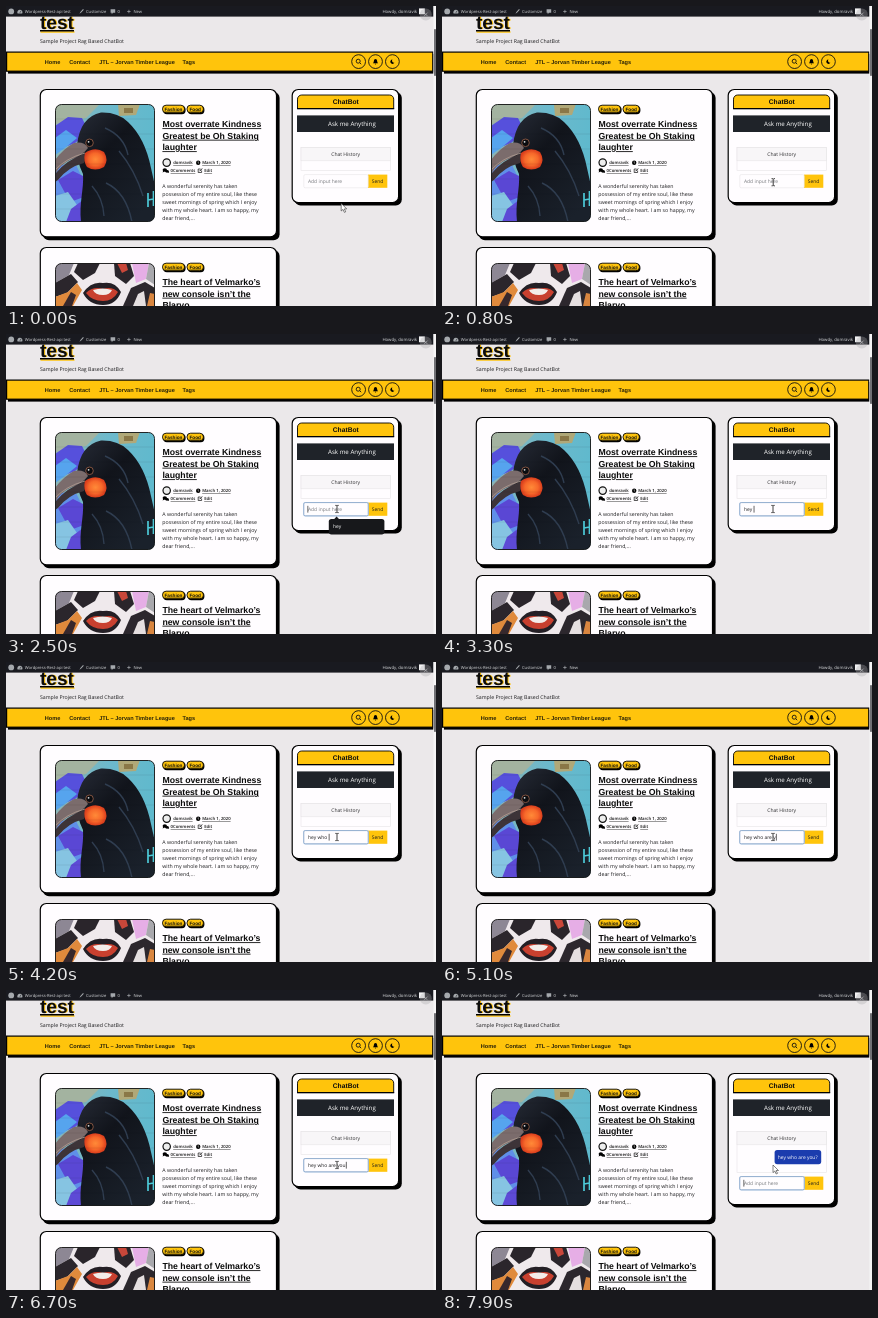
Write an HTML page that moves like this. It is 430x300 px and loops after 8000 ms.

```html
<!DOCTYPE html>
<html lang="en">
<head>
<meta charset="utf-8">
<title>ChatBot page</title>
<style>
  html, body { margin: 0; width: 100%; height: 100%; overflow: hidden; background: #ebe8ea; }
  svg { display: block; width: 430px; height: 300px; }
  text { font-family: "Open Sans", "Noto Sans", sans-serif; font-size: 5.22px; fill: #1c1c1e; text-rendering: geometricPrecision; white-space: pre; }
  .bold text, text.bold { font-family: "Liberation Sans", Arial, sans-serif; font-weight: 700; fill: #0c0c0c; }
  .nav text { font-size: 5.6px; fill: #2b2408; }
  .site { font-size: 19.1px; }
  .title text { font-size: 8.73px; text-decoration: underline; text-decoration-thickness: .8px; }
  .meta text { font-size: 4.25px; font-weight: 600; fill: #111; text-decoration: underline; text-decoration-thickness: .4px; }
  .tag text { font-size: 4.7px; text-decoration: underline; text-decoration-thickness: .4px; }
  .admin text { font-size: 4.15px; fill: #d8dadc; }
  .admin .right { font-size: 4.3px; text-anchor: end; }
  .field text { font-size: 4.92px; }
  .mid { text-anchor: middle; }
  .card { fill: #fffdff; stroke: #000; stroke-width: 1.2; }
  .pill { fill: #ffc40c; stroke: #000; stroke-width: .9; }
  .line { fill: none; stroke: #111; stroke-width: .9; }
</style>
</head>
<body>
<svg viewBox="0 0 430 300">
  <defs>
    <clipPath id="pic1"><rect x="49.5" y="98.5" width="99" height="117" rx="6"/></clipPath>
    <clipPath id="pic2"><rect x="49.5" y="257.5" width="99" height="117" rx="6"/></clipPath>
    <linearGradient id="wall" x2="1" y2=".3">
      <stop stop-color="#93b3ae"/><stop offset=".5" stop-color="#6db9cc"/><stop offset="1" stop-color="#5fb9cd"/>
    </linearGradient>
    <linearGradient id="plume" x2=".7" y2="1">
      <stop stop-color="#262b36"/><stop offset=".4" stop-color="#11141b"/><stop offset="1" stop-color="#1a212b"/>
    </linearGradient>
    <radialGradient id="cheek">
      <stop stop-color="#ff8a38"/><stop offset=".6" stop-color="#f7682a"/><stop offset="1" stop-color="#d93d1c"/>
    </radialGradient>
    <g id="tags" class="tag bold">
      <rect x="157.2" y="100" width="22.4" height="8.2" rx="3.6"/>
      <rect x="181.8" y="100" width="16.6" height="8.2" rx="3.6"/>
      <rect class="pill" x="156.5" y="99.2" width="22" height="7.6" rx="3.6"/>
      <rect class="pill" x="181" y="99.2" width="16.4" height="7.6" rx="3.6"/>
      <text class="mid" x="167.5" y="104.7">Fashion</text>
      <text class="mid" x="189.2" y="104.7">Food</text>
    </g>
  </defs>

  <rect width="430" height="300" fill="#ebe8ea"/>

  <!-- header -->
  <text class="bold site" x="35" y="23.4" style="fill:#ffc40c">test</text>
  <text class="bold site" x="34" y="22.6">test</text>
  <path d="M34.5 26h34" stroke="#ffc40c" stroke-width="1.4"/>
  <path d="M34 24.8h34" stroke="#000" stroke-width="1.5"/>
  <text x="34" y="37.4">Sample Project Rag Based ChatBot</text>

  <rect x="2" y="48" width="425.5" height="19.6"/>
  <rect class="pill" x=".6" y="46.1" width="426.2" height="19.1" style="stroke-width:1.2"/>
  <g class="bold nav">
    <text x="38.8" y="57.6">Home</text>
    <text x="63.2" y="57.6">Contact</text>
    <text x="93.2" y="57.6">JTL – Jorvan Timber League</text>
    <text x="176.4" y="57.6">Tags</text>
  </g>
  <g class="line">
    <circle cx="352.6" cy="55.6" r="6.9"/><circle cx="369.5" cy="55.6" r="6.9"/><circle cx="386.4" cy="55.6" r="6.9"/>
    <circle cx="352.2" cy="55.2" r="2"/><path d="M353.7 56.7l1.5 1.5"/>
  </g>
  <path d="M366.9 57.3q1-1 1-2.6a1.6 1.6 0 0 1 3.2 0q0 1.6 1 2.6zM368.8 57.8h1.4a.7.7 0 0 1-1.4 0z"/>
  <path d="M386.4 53.5a2.2 2.2 0 1 0 2 3.3a2.1 2.1 0 0 1-2-3.3z"/>

  <!-- first post -->
  <rect x="37" y="86" width="236.6" height="148.2" rx="6"/>
  <rect class="card" x="34.3" y="83.5" width="236.2" height="147.3" rx="6"/>
  <g clip-path="url(#pic1)">
    <rect x="49" y="98" width="100" height="118" fill="url(#wall)"/>
    <path d="M49 98h45l-14 14-31 6z" fill="#a3b3a0"/>
    <path d="M112 98h22l-4 11-17 1z" fill="#b0a878"/>
    <path d="M118 102h9v5h-9z" fill="#8a7747"/>
    <path d="M49 120l13-9 14 1 7 14-14 11-20 8z" fill="#5650dc"/>
    <path d="M49 132l11-8 11 8-12 10-10 7z" fill="#56a4ee"/>
    <path d="M49 160l20-3 11 22-4 37H49z" fill="#5f8fe8"/>
    <path d="M52 174l15-9 12 6-1 20-14 5z" fill="#5a47d4"/>
    <path d="M49 190l13-4 9 13-9 17H49z" fill="#86c4e2"/>
    <path d="M60 216l5-13 12-9 3 22z" fill="#5d4ad6"/>
    <path d="M75 216C73 196 78 184 77 168Q70 154 71 139Q74 111 95 106.5Q112 106 122 116Q139 132 145 162L149 180V216z" fill="url(#plume)"/>
    <path d="M49 154Q57 143 68 137Q78 135 82 142Q76 150 64 154Q55 158 49 168z" fill="#7b6c6c"/>
    <path d="M49 168Q60 154 80 147L78 157Q62 161 52 174L49 176z" fill="#3d3438"/>
    <path d="M49 164Q60 152 79 147" fill="none" stroke="#b29d92" stroke-width=".8"/>
    <circle cx="83.5" cy="136.8" r="3.8" fill="#0a0c10" stroke="#8d5a44" stroke-width=".9"/>
    <circle cx="82.6" cy="135.8" r=".9" fill="#dce1e4"/>
    <path d="M79 147q10-7 19-1 5 8 0 15-9 5-17 0-4-6-2-14z" fill="url(#cheek)"/>
    <path d="M100 177Q120 186 126 216M113 145Q129 164 137 190M99 122Q118 130 122 149M86 180Q97 192 98 210" fill="none" stroke="#2f3d50" stroke-width="1.4"/>
    <path d="M49 113h100M49 128h100M49 143h100M49 158h100M49 173h100M49 188h100M49 203h100" stroke="#000" stroke-opacity=".13" stroke-width=".6"/>
    <path d="M142 187v14M147.5 185v15M142 194l5.5-1" fill="none" stroke="#4cc9d7" stroke-width="1.7"/>
  </g>
  <rect class="line" x="49.5" y="98.5" width="99" height="117" rx="6"/>
  <use href="#tags"/>
  <g class="bold title">
    <text x="156.4" y="121.2">Most overrate Kindness</text>
    <text x="156.4" y="132.7">Greatest be Oh Staking</text>
    <text x="156.4" y="144.2">laughter</text>
  </g>
  <g class="meta">
    <circle cx="160.7" cy="156.6" r="3.7" fill="#eee" stroke="#111" stroke-width="1.2"/>
    <text x="167.2" y="158.3">domravik</text>
    <circle cx="192.2" cy="156.8" r="2.2"/>
    <path d="M192.2 155.3v1.6l1 .8" fill="none" stroke="#fff" stroke-width=".5"/>
    <text x="196.2" y="158.3">March 1, 2020</text>
    <ellipse cx="158.8" cy="164" rx="2.2" ry="1.7"/><ellipse cx="161" cy="165.3" rx="1.8" ry="1.4"/>
    <path d="M157.2 164.8l-.6 1.6 2-.8zM161.5 166.2l1.6.8-.4-1.6z"/>
    <text x="164.6" y="166.3">0Comments</text>
    <path d="M194.5 163h-2.3v3.5h3.4v-2" fill="none" stroke="#111" stroke-width=".7"/>
    <path d="M193.6 165.2l2.5-2.7" stroke="#111" stroke-width="1"/>
    <text x="198.2" y="166.3">Edit</text>
  </g>
  <g id="excerpt"></g>

  <!-- second post -->
  <rect x="37" y="244" width="236.6" height="100" rx="6"/>
  <rect class="card" x="34.3" y="241.5" width="236.2" height="100" rx="6"/>
  <g clip-path="url(#pic2)">
    <rect x="49" y="257" width="100" height="60" fill="#efe9ec"/>
    <path d="M49 257h19l-5 12-14 8z" fill="#8d8794"/>
    <path d="M49 277l16-9 7 8-11 11-12 4z" fill="#2b262c"/>
    <path d="M49 291l13-5 9-9 5 7-9 16H49z" fill="#e08a3c"/>
    <path d="M57 300l8-14 5 3-4 11z" fill="#37282c"/>
    <path d="M72 257h22l-5 10-12 7-9-8z" fill="#2a252b"/>
    <path d="M108 257h16l4 13-8 8-11-8z" fill="#2a252b"/>
    <path d="M111 257h9l2 7-6 3z" fill="#c9473a"/>
    <path d="M126 257h17l-3 16-10 4z" fill="#e6aee6"/>
    <path d="M143 257h6v22l-9-6z" fill="#a9a8ad"/>
    <path d="M77 287q8-12 20-10 12-2 18 9-5 13-18 13-14 0-20-12z" fill="#241f25"/>
    <path d="M80 287q7-7 17-4 9-3 15 3-5 9-15 9-11 0-17-8z" fill="#c8402f"/>
    <path d="M87 284q10-3 19 0-2 5-9 5-8 0-10-5z" fill="#f3ece9"/>
    <path d="M117 300l8-18 14-6 10 6v18z" fill="#2c272d"/>
    <path d="M127 300l5-12 6-3 2 15z" fill="#e5dfe0"/>
    <path d="M141 300l3-13 5 1v12z" fill="#d98640"/>
  </g>
  <rect class="line" x="49.5" y="257.5" width="99" height="117" rx="6"/>
  <use href="#tags" y="158"/>
  <g class="bold title">
    <text x="156.4" y="279.2">The heart of Velmarko’s</text>
    <text x="156.4" y="290.7">new console isn’t the</text>
    <text x="156.4" y="302.2">Blarvo</text>
  </g>

  <!-- chat widget -->
  <rect id="shadow" x="288.6" y="86" width="107.2" rx="6"/>
  <rect id="box" class="card" x="286.2" y="83.5" width="106.4" rx="6"/>
  <path class="pill" d="M291.5 102.6v-9.4a4.2 4.2 0 0 1 4.2-4.2h87.8a4.2 4.2 0 0 1 4.2 4.2v9.4z"/>
  <path d="M291 102.6h97.2" stroke="#000" stroke-width="1.2"/>
  <text class="bold mid" x="339.8" y="98.4" style="font-size:6.7px">ChatBot</text>
  <rect x="291" y="109.4" width="97" height="16.6" fill="#1f2329"/>
  <text x="322" y="120.2" style="font-size:6.15px;fill:#fff">Ask me Anything</text>
  <rect id="log" x="295" y="141.5" width="89.4" fill="#fffdff" stroke="#e6e4e6" stroke-width=".6"/>
  <rect x="295" y="141.5" width="89.4" height="13.3" fill="#f8f6f8" stroke="#e6e4e6" stroke-width=".6"/>
  <text class="mid" x="339.7" y="150.2" style="font-size:5.04px;fill:#2c2c2e">Chat History</text>
  <g id="bubble" class="field">
    <rect x="332.6" y="160" width="46.6" height="14.2" rx="2.6" fill="#1b3cae"/>
    <text x="335.8" y="169" style="fill:#fff">hey who are you?</text>
  </g>
  <g id="form" class="field">
    <rect x="362" y="168.6" width="19.3" height="13.2" fill="#ffc40c"/>
    <text class="mid" x="371.6" y="177">Send</text>
    <rect id="glow" x="297.2" y="168" width="65.6" height="14.4" rx="2" fill="#bcd3ee"/>
    <rect id="input" x="297.8" y="168.6" width="64.4" height="13.2" rx="1.4" fill="#fffdff"/>
    <text id="hint" x="302" y="177" style="fill:#77797d">Add input here</text>
    <text id="typed" x="302" y="177"></text>
    <rect id="caret" y="171.8" width=".6" height="6.8"/>
  </g>
  <g id="suggest" class="field">
    <rect x="322.8" y="185" width="55.6" height="15.4" rx="2.6" fill="#17181b"/>
    <path d="M328 185.2l2.6-2.8 2.6 2.8z" fill="#17181b"/>
    <text x="327" y="194.4" style="fill:#fff">hey</text>
  </g>

  <!-- admin bar -->
  <g class="admin">
    <rect width="427.5" height="10.6" fill="#191a20"/>
    <circle cx="5.2" cy="5.4" r="2.9" fill="#a5a9ad"/>
    <path d="M11.6 7.6a2.6 2.6 0 1 1 4.6 0z" fill="#a5a9ad"/><path d="M13.9 6.8l1.1-2" stroke="#191a20" stroke-width=".6"/>
    <text x="18.8" y="7">Wordpress-Rest-api test</text>
    <path d="M73.4 7.8l1.2-2 2.4-2.8.8.7-2.6 2.8z" fill="#a5a9ad"/>
    <text x="80" y="7">Customize</text>
    <path d="M104.6 3.2h4.6v3.6h-2.2l-1.3 1.4v-1.4h-1.1z" fill="#a5a9ad"/>
    <text x="111.4" y="7">0</text>
    <path d="M121.2 5.5h3.4M122.9 3.8v3.4" stroke="#a5a9ad" stroke-width=".7"/>
    <text x="127.4" y="7">New</text>
    <text class="right" x="411" y="7">Howdy, domravik</text>
    <rect x="413" y="2.4" width="5.8" height="5.8" fill="#f2f2f3"/>
    <circle cx="419.8" cy="8.4" r="6" fill="#a9a9ad" fill-opacity=".35"/>
    <path d="M418 6.6l3.6 3.6M421.6 6.6l-3.6 3.6" stroke="#e4e4e6" stroke-opacity=".7" stroke-width=".7"/>
  </g>
  <rect x="427.5" width="2.5" height="300" fill="#f6f5f6"/>
  <rect x="428" y="23" width="2" height="47" rx=".8" fill="#707074"/>

  <g id="pointer">
    <path id="arrow" d="M0 0v7.6l1.8-1.6 1.4 3 1.3-.6-1.4-2.9h2.4z" fill="#fff" stroke="#333" stroke-width=".6"/>
    <path id="beam" d="M-1.7-3.6h1.2l.5.5.5-.5h1.2M0-3.1v6.2M-1.7 3.6h1.2l.5-.5.5.5h1.2" fill="none" stroke="#111" stroke-width=".8"/>
  </g>
</svg>
<script>
  const LOOP = 8000, FOCUS = 1100, SUGGEST = 1300, TYPE = 2700, KEY = 200, ASK = 7000, SEND = 7300;
  const MESSAGE = "hey who are you?";
  const GROW = 18;
  const $ = id => document.getElementById(id);
  const set = (id, attrs) => { for (const k in attrs) $(id).setAttribute(k, attrs[k]); };
  const show = (id, on) => { $(id).style.display = on ? "" : "none"; };

  $("excerpt").innerHTML = [
    "A wonderful serenity has taken",
    "possession of my entire soul, like these",
    "sweet mornings of spring which I enjoy",
    "with my whole heart. I am so happy, my",
    "dear friend,…"
  ].map((s, i) => `<text x="156.3" y="${182 + i * 8}">${s}</text>`).join("");

  function typedAt(t) {
    if (t < TYPE || t >= SEND) return "";
    if (t >= ASK) return MESSAGE;
    return MESSAGE.slice(0, Math.min(MESSAGE.length - 1, 1 + Math.floor((t - TYPE) / KEY)));
  }

  function render(t) {
    const sent = t >= SEND, focused = t >= FOCUS;
    const typing = t >= TYPE && t < TYPE + KEY * MESSAGE.length;
    const text = typedAt(t), grow = sent ? GROW : 0;

    set("shadow", { height: 113.6 + grow });
    set("box", { height: 113 + grow });
    set("log", { height: 23 + grow });
    set("form", { transform: `translate(0 ${grow})` });
    set("input", { stroke: focused ? "#7f9fc4" : "#e6e4e6", "stroke-width": focused ? .8 : .6 });
    show("glow", focused);
    show("bubble", sent);
    show("suggest", t >= SUGGEST && t < TYPE);

    $("typed").textContent = text;
    show("hint", !text);
    const width = text ? $("typed").getComputedTextLength() + .3 : -.4;
    set("caret", { x: 302 + width });
    show("caret", focused && (typing || t % 1060 < 530));

    // pointer glides into the field, then rests
    const p = Math.min(1, Math.max(0, (t - 200) / 700)), e = p * p * (3 - 2 * p);
    const x = 335.2 - 4.2 * e, y = 197.4 - 22.4 * e;
    const inside = y < 181.8 && !sent;
    set("pointer", { transform: `translate(${x} ${y})` });
    show("beam", inside);
    show("arrow", !inside);
  }

  const start = performance.now();
  function tick() {
    const t = (performance.now() - start) % LOOP;
    render(Math.floor(t / 100) * 100);
    requestAnimationFrame(tick);
  }
  tick();
</script>
</body>
</html>
```
